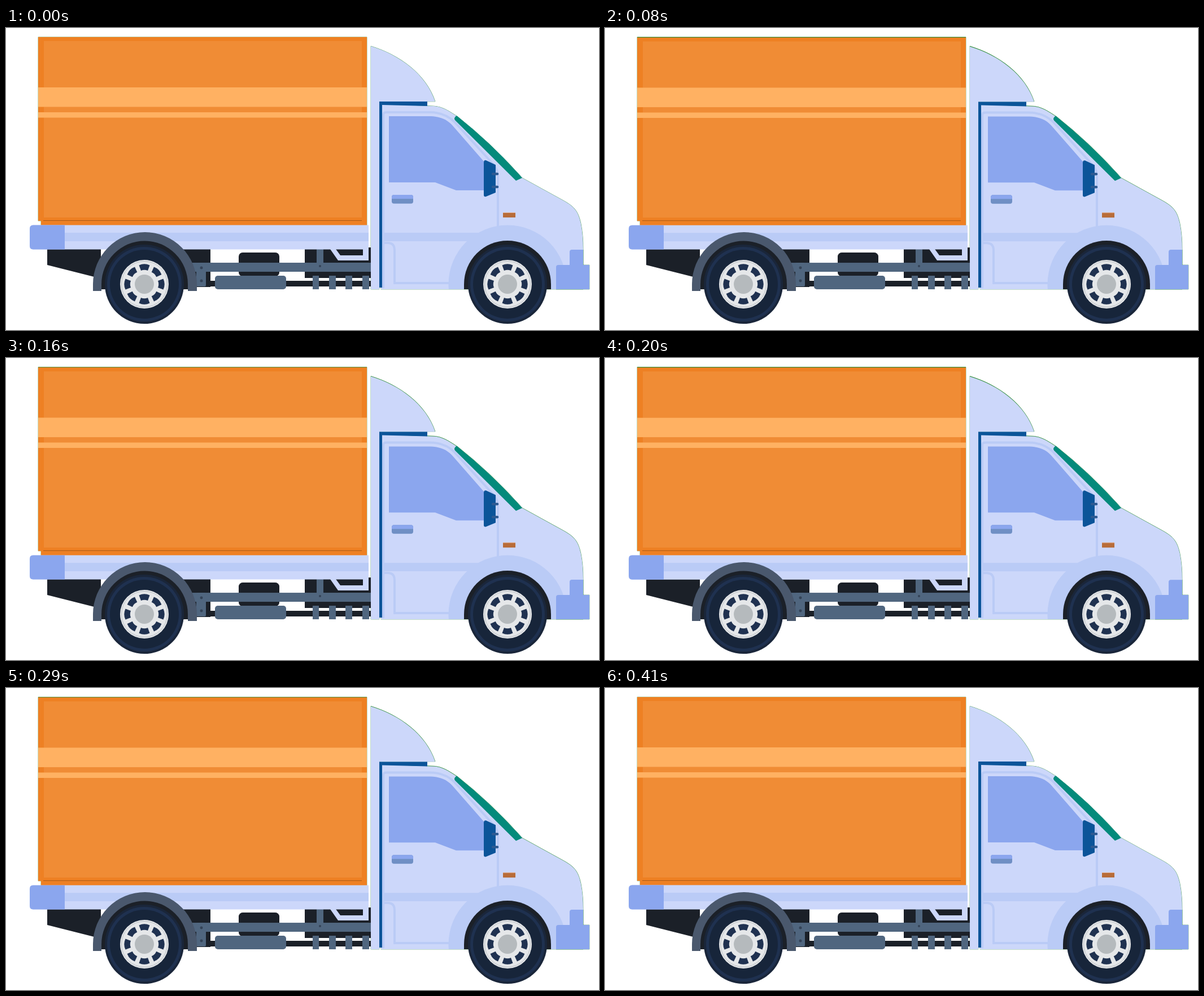
An HTML page for the animation above (0.51 s loop, 1050 px wide and 534 px high).

```html
<!DOCTYPE html>
<html lang="en">
<head>
<meta charset="utf-8">
<title>Delivery truck</title>
<style>
html, body { margin: 0; width: 100%; height: 100%; overflow: hidden; background: #fff; }
svg { display: block; width: 1050px; height: 534px; }
.pale { fill: #ccd7fa; }
.band { fill: #bacbf6; }
.blue { fill: #8ba6ee; }
.navy { fill: #0b5499; }
.slate { fill: #50667f; }
.black { fill: #1b2028; }
.orange { fill: #ee8023; }
.stripe { fill: #ffb162; }
.seam { fill: none; stroke: #bacbf6; stroke-width: 4; }
</style>
</head>
<body>
<svg viewBox="0 0 1050 534">
  <defs>
    <path id="box" d="M57 16H639V349H62V341H57Z"/>
    <path id="fairing" d="M646 32C698 48 744 82 760 130H661V462H646Z"/>
    <path id="cab" d="M664 135L757 138C774 139 786 148 800 157Q862 206 914 265L985 304C1005 315 1013 322 1018 346Q1022 366 1022 392V462H664Z"/>
    <path id="bed" d="M48 348.5H642V391.5H48Q42 391.5 42 385V355Q42 348.5 48 348.5Z"/>
    <path id="bumper" d="M998 419V396Q998 392 1002 392H1022V419H1033V462H974V423Q974 419 978 419Z"/>
    <clipPath id="above"><rect width="1050" height="462"/></clipPath>
    <g id="wheel">
      <circle r="70" fill="#1a263a"/>
      <circle r="66" fill="#1f3150"/>
      <circle r="61" fill="#17253a"/>
      <circle r="43" fill="#e5e7e9"/>
      <circle r="40.5" fill="none" stroke="#b9bec4" stroke-width="1"/>
      <g id="slots" fill="#1f3150"></g>
      <circle r="17" fill="#b5babd"/>
    </g>
  </defs>

  <!-- fixed outline that shows where the body dips -->
  <g fill="#0c7a18" stroke="#0c7a18" stroke-width=".5">
    <use href="#box"/><use href="#fairing"/><use href="#cab"/><use href="#bumper"/>
  </g>

  <g clip-path="url(#above)">
    <g id="body">
      <g class="black">
        <path d="M73 391H168V443L73 419Z"/>
        <path d="M300 391H362V458H300Z"/>
        <rect x="412" y="397" width="72" height="42" rx="7"/>
        <path d="M529 391H646V442H529Z"/>
        <path d="M338 447H646V457H338Z"/>
        <path d="M642 388H646V392H642Z"/>
      </g>
      <g class="slate">
        <rect x="330" y="415" width="316" height="16"/>
        <rect x="337" y="415" width="17" height="42" rx="2"/>
        <rect x="550" y="391" width="12" height="35"/>
        <rect x="370" y="438" width="126" height="24" rx="5"/>
        <rect x="543" y="438" width="11" height="24"/>
        <rect x="572" y="438" width="12" height="24"/>
        <rect x="601" y="438" width="12" height="24"/>
        <rect x="631" y="438" width="12" height="24"/>
      </g>
      <g fill="#344357">
        <circle cx="346" cy="424" r="2.5"/><circle cx="346" cy="447" r="2.5"/><circle cx="556" cy="421" r="2"/>
      </g>
      <path d="M574 391H584L592 402H632V391H642V411H588Z" class="pale"/>

      <use href="#box" class="orange"/>
      <rect x="67" y="23" width="563" height="312" fill="#f08c35"/>
      <path d="M66 340.5H630" stroke="#a85b18" stroke-width="1"/>
      <path d="M57 105H639V139.5H57ZM57 149H639V158.5H57Z" class="stripe"/>

      <use href="#bed" class="pale"/>
      <path d="M103 362H642V377H103Z" class="band"/>
      <path d="M48 348.5H104V391.5H48Q42 391.5 42 385V355Q42 348.5 48 348.5Z" class="blue"/>

      <use href="#cab" class="pale"/>
      <use href="#fairing" class="pale"/>
      <path d="M661 130H746V138L666 136V459H661Z" class="navy"/>
      <path d="M666 362H850V377H666Z" class="band"/>
      <path class="seam" d="M668 460V153Q668 149 674 149H750Q777 149 794 166L862 240Q871 250 871 262V352M668 380H676Q688 380 688 393V451H785"/>
      <circle cx="888" cy="453" r="104.5" class="band"/>
      <path d="M678 156H748C768 156 781 161 792 174L847 237V287H797L760 273H678Z" class="blue"/>
      <path d="M798 155Q862 206 914 265L903 270L795 163Q792 159 798 155Z" fill="#048a7b"/>
      <path d="M850 234L867 242V291L850 298Q846 299 846 295V238Q846 233 850 234Z" class="navy"/>
      <path d="M862 258H870M862 281H870" stroke="#2d5a92" stroke-width="4.5" stroke-linecap="round"/>
      <rect x="683" y="295" width="38" height="15.5" rx="4" fill="#6f8fc4"/>
      <path d="M683 302V299Q683 295 687 295H717Q721 295 721 299V302Z" class="blue"/>
      <rect x="880" y="326" width="22" height="9" fill="#b86c38"/>
      <path d="M880 326.5H902" stroke="#e2b9a5"/>
      <use href="#bumper" class="blue"/>
    </g>
  </g>

  <path d="M811 462V453A77 77 0 0 1 965 453V462Z" class="black"/>
  <path d="M154 465V453A92 92 0 0 1 338 453V465Z" fill="#4a586d"/>
  <path d="M169 466V453A76.5 76.5 0 0 1 322 453V466Z" class="black"/>
  <path d="M169 462H322V467H169Z" fill="#fff"/>
  <use href="#wheel" x="245" y="453"/>
  <use href="#wheel" x="888" y="453"/>
</svg>
<script>
const body = document.getElementById('body');
const slots = document.getElementById('slots');
const top0 = 16, ground = 462;
const dips = [0, 1.9, .7, 0, .6, .8, 0, .6, 1.9, .7, 0];

for (let i = 0; i < 8; i++) {
  slots.innerHTML += `<path transform="rotate(${i * 45})"
    d="M-9.5 -33.5Q0 -38 9.5 -33.5L6 -24Q0 -26.5 -6 -24Z"/>`;
}

// The suspension squeezes: the roof sinks most, the sill stays put.
function draw() {
  const t = performance.now() % 510;
  const step = t < 250 ? Math.min(5, Math.floor(t / 40)) : Math.min(10, Math.floor((t - 10) / 40));
  const squeeze = dips[step] / (ground - top0);
  body.setAttribute('transform', `matrix(1 0 0 ${1 - squeeze} 0 ${squeeze * ground})`);
  requestAnimationFrame(draw);
}
draw();
</script>
</body>
</html>
```
